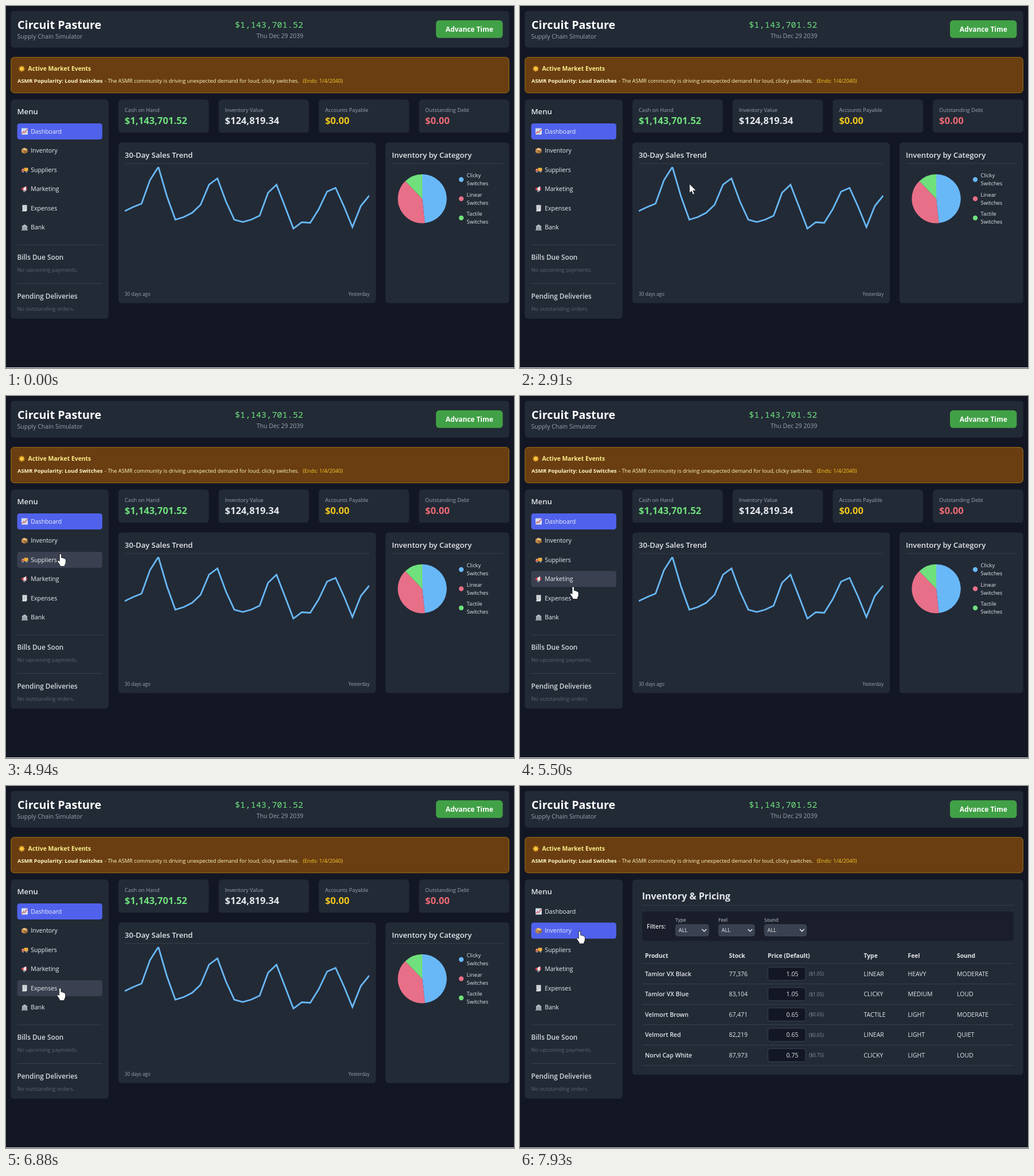
These frames come from a looping animation (886 by 632 pixels, 8000 ms). An HTML page:

```html
<!DOCTYPE html>
<html lang="en">
<head>
<meta charset="utf-8">
<title>Supply Chain Simulator</title>
<style>
html, body { margin: 0; width: 100%; height: 100%; overflow: hidden; background: #131724; }
svg { display: block; }
text { font-family: "Open Sans", "Noto Sans", sans-serif; white-space: pre; }
.mono { font-family: "Noto Sans Mono", "DejaVu Sans Mono", monospace; }
</style>
</head>
<body>
<svg id="stage" width="886" height="632" viewBox="0 0 886 632"></svg>
<script>
const CARD = '#222a36', DARK = '#131724', RULE = '#424956', LIGHT = '#e5e7eb', GREY = '#9ca3af',
      BLUE = '#68b8f8', PINK = '#e86f88', GREEN = '#6fe07c';
const BODY = 10.5, SMALL = 9.28, TINY = 8.15, HAIR = .7;
const LOOP = 8000, CLICK = 7670, SWITCH = 7740;

const box = (x, y, r, b, fill, rad = 5.6, extra = '') =>
  `<rect x="${x}" y="${y}" width="${r - x}" height="${b - y}" rx="${rad}" fill="${fill}" ${extra}/>`;
const outlined = (x, y, r, b, fill, stroke, rad) =>
  box(x + HAIR / 2, y + HAIR / 2, r - HAIR / 2, b - HAIR / 2, fill, rad, `stroke="${stroke}" stroke-width="${HAIR}"`);
const rule = (x, r, y) => box(x, y, r, y + HAIR, RULE, 0);
const text = (x, y, str, size = BODY, fill = LIGHT, weight = 400, extra = '') =>
  `<text x="${x}" y="${y}" font-size="${size}" fill="${fill}" font-weight="${weight}" ${extra}>${str}</text>`;
const END = 'text-anchor="end"';
const path = (d, fill, extra = '') => `<path d="${d}" fill="${fill}" ${extra}/>`;
const stroke = (d, color, width, extra = '') =>
  path(d, 'none', `stroke="${color}" stroke-width="${width}" ${extra}`);

// Menu: label and an 11 px icon
const menu = [
  ['Dashboard', box(0, 0, 11, 11, '#dfe5ea', 1) + stroke('M0 3.7H11M0 7.4H11M3.7 0V11M7.4 0V11', '#a9c3d3', .6) +
    stroke('M.5 9.5L3.5 6 5.5 7.5 10.5 1.5', '#d8475a', 1.3)],
  ['Inventory', path('M0 3L5.5 .5 11 3 5.5 5.5Z', '#e3b06a') + path('M0 3L5.5 5.5V11L0 8.5Z', '#c28a45') +
    path('M11 3L5.5 5.5V11L11 8.5Z', '#9c6a34') + path('M2.3 2L7.8 4.5V6.5L9 6V4L3.8 1.4Z', '#f1d8a8')],
  ['Suppliers', box(4.5, 2, 11.5, 8, '#f0b23c', .8) + path('M0 8.5V5.5L1.5 3.5H4.5V8.5Z', '#e0603f') +
    path('M.9 5.6L1.9 4.3H3.4V5.6Z', '#bfe2f2') + '<circle cx="2.7" cy="9" r="1.5" fill="#8d949e"/><circle cx="8.8" cy="9" r="1.5" fill="#8d949e"/>'],
  ['Marketing', path('M1 4.5L8 .8V9.2L1 6.8Z', '#e9e4e6') + path('M0 4.2L3.5 3V8L0 7Z', '#d5404f') +
    path('M8 .8Q11.5 5 8 9.2Z', '#d5404f') + stroke('M3.3 7.5L4 10.3H5.8L5.3 8.5', '#b9bec6', 1.1)],
  ['Expenses', path('M1.5 0H9.5V9L8.5 11H.8L1.8 9Z', '#e6e8ea') +
    stroke('M3 2.3H8M3 4.3H8M3 6.3H8M3 8.3H6', '#9aa2ab', .8)],
  ['Bank', path('M0 4L5.5 .3 11 4Z', '#b9bfc6') + box(0, 9.5, 11, 11, '#a6adb5', 0) + box(1, 4, 10, 9.5, '#6f7780', 0) +
    stroke('M1.8 4V9.5M4.2 4V9.5M6.8 4V9.5M9.2 4V9.5', '#d3d7db', 1.2)]
];
const itemTop = i => 205.1 + i * 33.5, ITEM_H = 27.9;

function frame() {
  const rays = Array.from({ length: 8 }, (_, i) => {
    const a = i * Math.PI / 4, c = Math.cos(a), s = Math.sin(a);
    return `M${27.5 + 3.5 * c} ${109.5 + 3.5 * s}L${27.5 + 5.5 * c} ${109.5 + 5.5 * s}`;
  }).join('');
  return box(0, 0, 886, 632, DARK, 0) + box(0, 631, 886, 632, '#e4e5e8', 0) +
    box(8.4, 8.4, 877.6, 72.4, CARD) +
    text(20, 40.3, 'Circuit Pasture', 19.8, '#fff', 700) +
    text(19.5, 57, 'Supply Chain Simulator', BODY, GREY) +
    text(518.5, 37.7, '$1,143,701.52', 15.3, GREEN, 400, END + ' class="mono"') +
    text(518.5, 55.5, 'Thu Dec 29 2039', BODY, GREY, 400, END) +
    box(749.9, 25.1, 866.4, 55.8, '#41a146') +
    text(808.2, 45.2, 'Advance Time', 11.9, '#fff', 700, 'text-anchor="middle"') +
    outlined(8.4, 89.2, 877.6, 152, '#6a3e11', '#c08a14', 5.6) +
    stroke(rays, '#f0a52c', 1.6) + '<circle cx="27.5" cy="109.5" r="3.6" fill="#fbc63b"/>' +
    text(38.6, 113.4, 'Active Market Events', 10.4, '#fdee8c', 700) +
    text(20, 134, 'ASMR Popularity: Loud Switches', 9.3, '#fef8c8', 700) +
    text(172, 134, '- The ASMR community is driving unexpected demand for loud, clicky switches.', SMALL, '#fef8c8') +
    text(517.7, 134, '(Ends: 1/4/2040)', SMALL, '#f8cc2c') +
    box(8.4, 163.3, 179, 546, CARD) +
    text(19.5, 189.3, 'Menu', 13.1, LIGHT, 600) +
    menu.map(([name, icon], i) => {
      const y = itemTop(i);
      return box(19.55, y, 167.9, y + ITEM_H, 'none', 4.2, 'class="item"') +
        `<g transform="translate(27 ${y + 8.3})">${icon}</g>` + text(43.2, y + 17.8, name, BODY, '#eef0f4');
    }).join('') +
    rule(19.6, 168, 416.6) + text(19.5, 443, 'Bills Due Soon', 11.8, '#d6d9de', 600) +
    text(19.5, 464.4, 'No upcoming payments.', SMALL, '#5f6573') +
    rule(19.6, 168, 484.2) + text(19.5, 510.6, 'Pending Deliveries', 11.8, '#d6d9de', 600) +
    text(19.5, 532, 'No outstanding orders.', SMALL, '#5f6573');
}

function dashboard() {
  const stats = [['Cash on Hand', '$1,143,701.52', GREEN], ['Inventory Value', '$124,819.34', LIGHT],
    ['Accounts Payable', '$0.00', '#efc51b'], ['Outstanding Debt', '$0.00', '#ee6a73']];
  const sales = [358, 351, 345, 304, 281, 332, 373, 368.5, 361, 347, 312, 301, 341, 373, 377, 373, 366, 326, 312,
    350, 388.5, 377.5, 378.5, 355, 324, 317.5, 350, 386, 349, 331];
  const line = 'M' + sales.map((y, i) => `${(207 + i * 14.71).toFixed(1)} ${y}`).join('L');
  const at = f => `${726 + 42.7 * Math.sin(f * 2 * Math.PI)} ${336.5 - 42.7 * Math.cos(f * 2 * Math.PI)}`;
  const slice = (a, b, fill) => path(`M726 336.5L${at(a)}A42.7 42.7 0 0 1 ${at(b)}Z`, fill);
  const legend = [['Clicky', BLUE], ['Linear', PINK], ['Tactile', GREEN]];
  return stats.map(([label, value, color], i) => {
      const x = 196 + i * 174.7;
      return box(x, 163.3, x + 157.7, 221.3, CARD) + text(x + 11, 184.6, label, SMALL, GREY) +
        text(x + 11, 206.2, value, 16.6, color, 700);
    }).join('') +
    box(196, 238.3, 645, 518.8, CARD) +
    text(207, 264.5, '30-Day Sales Trend', 13.1, LIGHT, 600) + rule(207, 634, 274.6) +
    '<clipPath id="plot"><rect x="207" y="281" width="426.6" height="210"/></clipPath>' +
    stroke(line, BLUE, 2.8, 'clip-path="url(#plot)"') +
    text(207, 506, '30 days ago', TINY, GREY) + text(634, 506, 'Yesterday', TINY, GREY, 400, END) +
    box(661.8, 238.3, 877.6, 518.8, CARD) +
    text(673, 264.5, 'Inventory by Category', 13.1, LIGHT, 600) + rule(673, 867, 274.6) +
    slice(0, .483, BLUE) + slice(.483, .878, PINK) + slice(.878, 1, GREEN) +
    legend.map(([name, color], i) => {
      const y = 303 + i * 33.5;
      return `<circle cx="794" cy="${y}" r="4.2" fill="${color}"/>` +
        text(803.6, y - 3.6, name, SMALL) + text(803.6, y + 10.4, 'Switches', SMALL);
    }).join('');
}

function inventory() {
  const cols = [218, 364.5, 432, 599.5, 676.5, 762];
  const heads = ['Product', 'Stock', 'Price (Default)', 'Type', 'Feel', 'Sound'];
  const rows = [
    ['Tamlor VX Black', '77,376', '1.05', 'LINEAR', 'HEAVY', 'MODERATE'],
    ['Tamlor VX Blue', '83,104', '1.05', 'CLICKY', 'MEDIUM', 'LOUD'],
    ['Velmort Brown', '67,471', '0.65', 'TACTILE', 'LIGHT', 'MODERATE'],
    ['Velmort Red', '82,219', '0.65', 'LINEAR', 'LIGHT', 'QUIET'],
    ['Norvi Cap White', '87,973', '0.75', 'CLICKY', 'LIGHT', 'LOUD']
  ];
  const filters = [['Type', 271, 329.5], ['Feel', 346, 409.5], ['Sound', 426, 500]];
  return box(196, 163.3, 877.6, 504.3, CARD) +
    text(212.7, 198, 'Inventory &amp; Pricing', 16.1, LIGHT, 700) + rule(213, 861, 207.8) +
    box(213, 219.3, 861, 270.6, '#191e2a') + text(221, 249, 'Filters:', 10.2, LIGHT, 600) +
    filters.map(([name, x, r]) => text(x, 237, name, TINY, GREY, 600) +
      outlined(x, 241.5, r, 262.3, '#3a4150', '#4b5361', 4) + text(x + 5.6, 255.4, 'ALL', SMALL, '#f1f2f5') +
      stroke(`M${r - 12} 250L${r - 8.2} 253.8L${r - 4.4} 250`, '#f1f2f5', 1.4)).join('') +
    heads.map((h, i) => text(cols[i], 299.6, h, 10.3, LIGHT, 700)).join('') + rule(213, 861, 309.4) +
    rows.map((row, n) => {
      const y = 328 + n * 35.55;
      return row.map((v, i) => i === 2
        ? outlined(432, y - 12, 498.5, y + 11.6, DARK, '#4b5361', 4) + text(485.4, y + 3.8, v, BODY, LIGHT, 400, END) +
          text(504, y + 3, `($${v})`, TINY, '#8b92a0')
        : text(cols[i], y + 3.8, v, BODY, LIGHT, i ? 400 : 600)).join('') + rule(213, 861, y + 17.3);
    }).join('');
}

const OUTLINE = 'stroke="#0b0d14" stroke-width=".8" stroke-linejoin="round"';
const pointer = path('M.4 .4V16.6L4.1 13.2L6.7 19.2L9.4 18L6.8 12.2H12.2Z', '#fff', OUTLINE);
const hand = path('M-1.7 1.6Q-1.7 0 0 0Q1.7 0 1.7 1.6V7Q3.8 6.3 4.6 7.6Q6.4 7.2 7 8.6Q9.4 8.4 9.4 10.8V15' +
  'Q9.4 17.6 7.7 19V21.8H-1V19.6L-5 13.8Q-5.8 11.8-4.2 11.5Q-2.9 11.4-1.7 13Z', '#fff', OUTLINE);

const stage = document.getElementById('stage');
stage.innerHTML = frame() + `<g id="dash">${dashboard()}</g><g id="inv">${inventory()}</g>` +
  '<circle id="click" cx="104" cy="253.5" r="12.6" fill="#a3a02c" fill-opacity=".93"/>' +
  `<g id="cursor"><g id="pointer">${pointer}</g><g id="hand">${hand}</g></g>`;
const $ = id => document.getElementById(id);
const items = [...document.querySelectorAll('.item')];
const show = (id, on) => $(id).setAttribute('display', on ? 'inline' : 'none');

// Cursor keys: time, x, y; a fourth value marks a rest
const keys = [
  [780, 804, 592, 1], [1416, 571, 402], [1556, 492, 366], [2050, 300, 312, 1],
  [2840, 300, 312, 1], [2910, 295, 310], [3480, 150, 203], [3690, 130, 203], [4530, 102, 243],
  [4940, 95, 275.5], [5360, 93, 319], [5990, 92, 376], [6200, 93, 387, 1],
  [6550, 93, 387, 1], [7380, 101, 254], [7520, 104, 253.5, 1]
];
// Stretches of movement: start, end, number of ticks
const runs = [[780, 2050, 18], [2910, 6200, 47], [6620, 7520, 13]];

// Moves advance in ticks; between them the cursor rests where the last one ended
function snap(t) {
  let rest = 780;
  for (const [a, b, n] of runs) {
    if (t < a) break;
    const d = (b - a) / n;
    if (t < b) return a + Math.floor((t - a) / d + .1) * d;
    rest = b;
  }
  return rest;
}

function slope(i, c) {
  const a = keys[i - 1], k = keys[i], b = keys[i + 1];
  if (k[3]) return 0;
  const l = (k[c] - a[c]) / (k[0] - a[0]), r = (b[c] - k[c]) / (b[0] - k[0]);
  return l * r > 0 ? 2 * l * r / (l + r) : 0;
}

function cursorAt(t) {
  const last = keys[keys.length - 1];
  if (t >= last[0]) return [last[1], last[2]];
  const i = keys.findIndex(k => k[0] > t) - 1, a = keys[i], b = keys[i + 1];
  const d = b[0] - a[0], u = (t - a[0]) / d, v = 1 - u;
  return [1, 2].map(c => v * v * ((1 + 2 * u) * a[c] + u * d * slope(i, c)) +
    u * u * ((1 + 2 * v) * b[c] - v * d * slope(i + 1, c)));
}

function draw(t) {
  const visible = t >= 780, moved = t >= SWITCH, active = moved ? 1 : 0;
  const [x, y] = cursorAt(snap(t));
  const over = x > 19.6 && x < 168 ? menu.findIndex((_, i) => y >= itemTop(i) && y <= itemTop(i) + ITEM_H) : -1;
  $('cursor').setAttribute('transform', `translate(${x.toFixed(1)} ${y.toFixed(1)})`);
  show('cursor', visible);
  show('hand', over >= 0);
  show('pointer', over < 0);
  show('dash', !moved);
  show('inv', moved);
  show('click', t >= CLICK && !moved);
  items.forEach((el, i) => el.setAttribute('fill', i === active ? '#5062ec' : i === over ? '#3a404f' : 'none'));
}

const start = performance.now();
function tick() {
  draw((performance.now() - start) % LOOP);
  requestAnimationFrame(tick);
}
tick();
</script>
</body>
</html>
```
